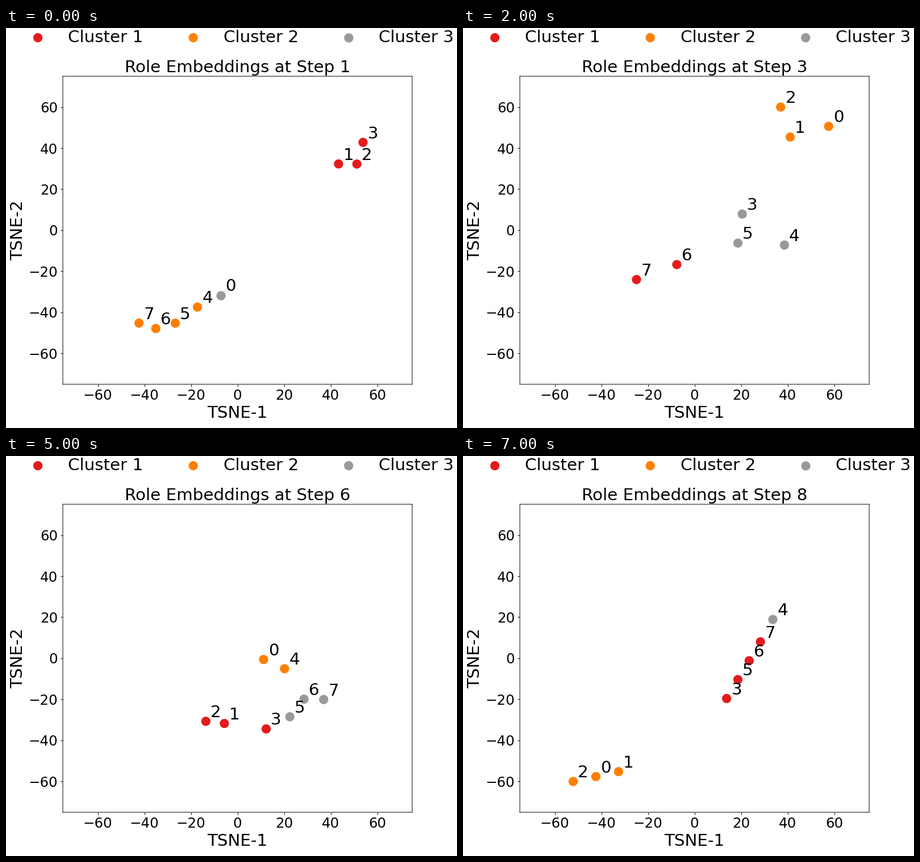
Recreate the animation shown at these times as a matplotlib script. Size 794 by 706 pixels, loop 8 s.

```python
import numpy as np
import matplotlib.pyplot as plt
from matplotlib.animation import FuncAnimation

RED, ORANGE, GRAY = COLORS = ["#e41a1c", "#ff7f00", "#999999"]
LIMIT = 75
TICKS = range(-60, 61, 20)
LAST_STEP = 8

# Neighbouring roles lie evenly along an arc: color, roles, start, end, bend
# (x + yj); the bend is how far the middle of the arc is off its chord.
ARCS = {
    1: [(GRAY, "0", -7.3 - 31.6j),
        (RED, "123", 43.4 + 32.3j, 53.9 + 42.8j, 2.6 - 5.3j),
        (ORANGE, "4567", -17.2 - 37.4j, -42.3 - 45.2j, -1.3 - 5.9j)],
    3: [(ORANGE, "012", 57.6 + 50.6j, 37 + 60j, -6.2 - 9.9j),
        (GRAY, "354", 20.5 + 7.9j, 38.6 - 7.2j, -10.9 - 6.6j),
        (RED, "67", -7.6 - 16.7j, -24.9 - 24j)],
    4: [(GRAY, "02", 46.4 + 60j, 60 + 54j),
        (RED, "431", 13.5 + 28.8j, 21.1 - 14.8j, -13.7 - 5.6j),
        (ORANGE, "567", -12.3 - 6.3j, -46.4 - 24.6j, -3.5 - 1.8j)],
    5: [(RED, "02", 32.6 + 59j, -40.1 + 31.2j),
        (ORANGE, "13", -25.1 + 8.7j, -10.4 - 5.1j),
        (GRAY, "45", 38.1 + 28.4j, 36.6 - 7.9j),
        (GRAY, "76", 44.7 - 36.4j, 60 - 33.4j)],
    6: [(ORANGE, "04", 11.2 - 0.6j, 20.2 - 5.1j),
        (RED, "213", -13.6 - 30.7j, 12.3 - 34.4j, -5 + 0.8j),
        (GRAY, "567", 22.5 - 28.5j, 37 - 20.1j, -1.2 + 4.4j)],
    8: [(ORANGE, "201", -52.1 - 60j, -32.6 - 55.2j),
        (RED, "3567", 13.8 - 19.6j, 28.3 + 8j),
        (GRAY, "4", 33.5 + 18.9j)],
}
# Steps halfway between their neighbours, and the step whose colors they share.
HALFWAY = {2: 1, 7: 8}


def arc(roles, start, end=0, bend=0):
    t = np.linspace(0, 1, len(roles))
    return zip(roles, start + (end - start) * t + 4 * t * (1 - t) * bend)


def embed(step):
    """Map each role to its color and position."""
    if step in HALFWAY:
        before, after = embed(step - 1), embed(step + 1)
        colors = embed(HALFWAY[step])
        return {r: (colors[r][0], (before[r][1] + after[r][1]) / 2) for r in before}
    return {role: (color, z) for color, *shape in ARCS[step]
            for role, z in arc(*shape)}


plt.rcParams["font.family"] = "DejaVu Sans"
fig, ax = plt.subplots(figsize=(9, 8), dpi=88.25)  # 794 x 706 pixels
fig.subplots_adjust(left=0.126, right=0.9003, bottom=0.1093, top=0.8794)


def draw(frame):
    step = frame + 1
    roles = embed(step)
    ax.clear()
    for k, color in enumerate(COLORS, 1):
        group = np.array([z for c, z in roles.values() if c == color])
        ax.scatter(group.real, group.imag, s=150, c=[color] * len(group),
                   label=f"Cluster {k}")
    for role, (_, z) in roles.items():
        ax.text(z.real + 2, z.imag + 2, role, fontsize=24)

    ax.set(xlim=(-LIMIT, LIMIT), ylim=(-LIMIT, LIMIT), xticks=TICKS, yticks=TICKS)
    ax.tick_params(labelsize=20)
    for spine in ax.spines.values():
        spine.set_snap(False)
    ax.set_title(f"Role Embeddings at Step {step}", fontsize=24)
    ax.set_xlabel("TSNE-1", fontsize=24)
    ax.set_ylabel("TSNE-2", fontsize=24)
    ax.legend(loc="upper center", bbox_to_anchor=(0.5, 1.2), ncol=3,
              fontsize=24, frameon=False)
    return []


anim = FuncAnimation(fig, draw, frames=LAST_STEP, init_func=lambda: draw(0),
                     interval=1000, repeat=True)
plt.show()
```
